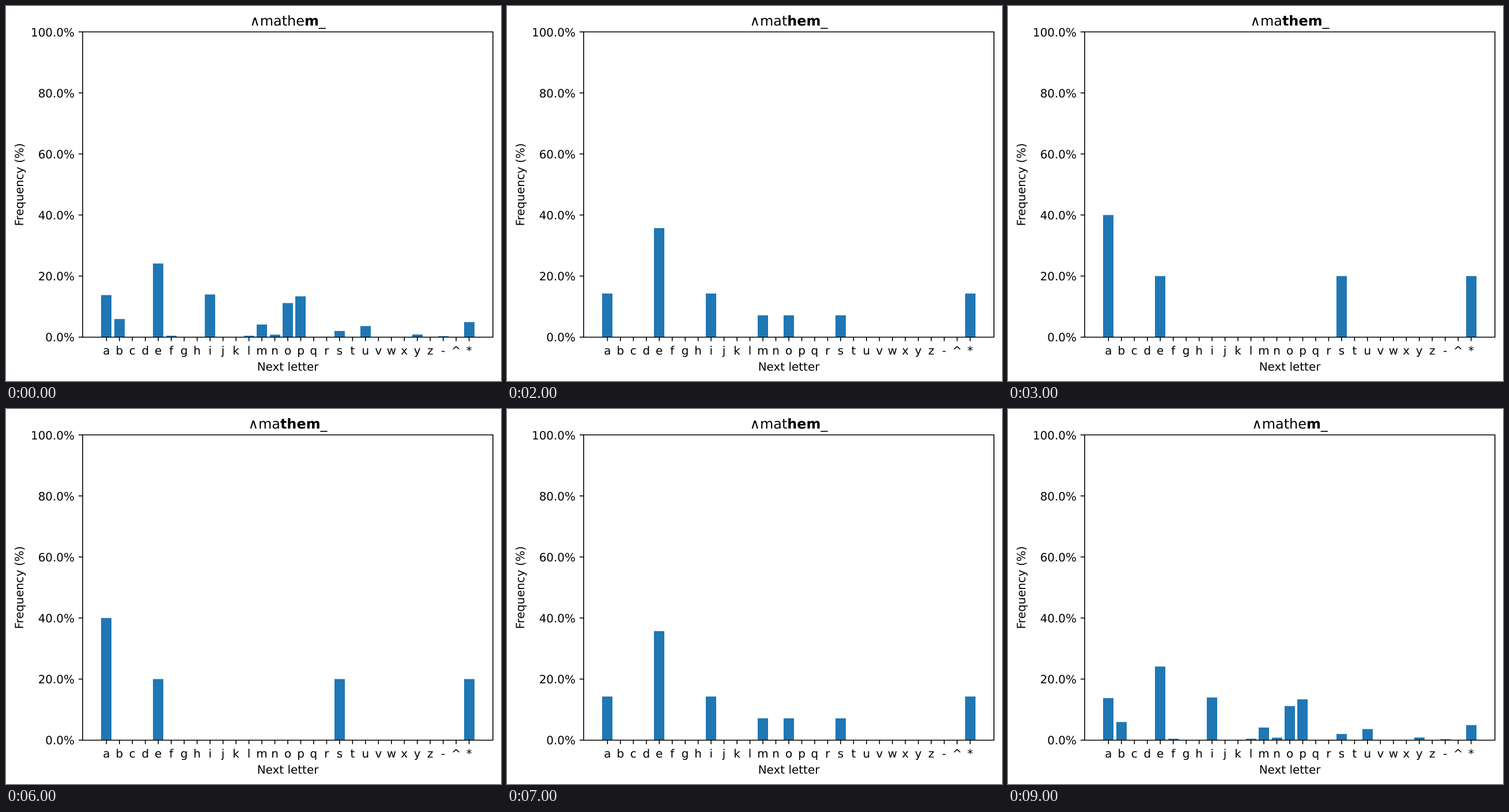
Write an HTML page that moves like this. It is 859 px wide and 652 px high and loops after 10000 ms.

```html
<!DOCTYPE html>
<html lang="en">
<head>
<meta charset="utf-8">
<title>Next letter frequency</title>
<style>
  html, body { margin: 0; width: 100%; height: 100%; overflow: hidden; background: #fff; }
  svg { display: block; width: 859px; height: 652px; }
  text { font: 19.94px "DejaVu Sans", sans-serif; text-rendering: geometricPrecision; white-space: pre; }
  .title { font-size: 23.93px; }
  .bold { font-weight: bold; }
  .line { fill: none; stroke: #000; stroke-width: 1.6; }
</style>
</head>
<body>
<svg viewBox="0 0 859 652">
  <g id="bars" fill="#1f77b4"></g>
  <g id="axes"></g>
  <text class="title" x="489" y="33.5" text-anchor="middle"><tspan id="plain"></tspan><tspan id="context" class="bold"></tspan><tspan>_</tspan></text>
</svg>
<script>
const LETTERS = [...'abcdefghijklmnopqrstuvwxyz-^*'];
const WORD = 'mathem';
const LEFT = 133, RIGHT = 845, TOP = 45, BOTTOM = 575.7;
const STEP = (RIGHT - LEFT) / 31.68;
const LOOP = 10000;

// Relative frequency of the next letter, by length of the bold context.
const CONTEXTS = {
  1: { a: 13.7, b: 5.9, e: 24, f: .45, i: 13.9, l: .45, m: 4.1, n: .8, o: 11.1, p: 13.3,
       r: .15, s: 2, u: 3.6, y: .85, '-': .3, '*': 4.9 },
  2: { a: 13, b: 12, e: 24, i: 10, m: 2, n: 1, o: 11, p: 11, s: 6, u: 2, y: 1, '*': 8 },
  3: { a: 2, e: 5, i: 2, m: 1, o: 1, s: 1, '*': 2 },
  4: { a: 2, e: 1, s: 1, '*': 1 },
  5: { a: 1 }
};

const byId = id => document.getElementById(id);
const centre = i => LEFT + (1.84 + i) * STEP;

function add(parent, name, attrs, content = '') {
  const node = document.createElementNS('http://www.w3.org/2000/svg', name);
  for (const key in attrs) node.setAttribute(key, attrs[key]);
  node.textContent = content;
  return parent.appendChild(node);
}

function label(content, x, y, anchor = 'middle', extra = {}) {
  add(byId('axes'), 'text', { x, y, 'text-anchor': anchor, ...extra }, content);
}

function line(d) {
  add(byId('axes'), 'path', { d, class: 'line' });
}

line(`M${LEFT} ${TOP}H${RIGHT}V${BOTTOM}H${LEFT}Z`);
for (let p = 0; p <= 100; p += 20) {
  const y = BOTTOM - p / 100 * (BOTTOM - TOP);
  line(`M${LEFT} ${y}h-7`);
  label(p.toFixed(1) + '%', 119, y + 7.6, 'end');
}
const bars = LETTERS.map((letter, i) => {
  const x = centre(i);
  line(`M${x} ${BOTTOM}v7`);
  label(letter, x, 605.6);
  const left = Math.round(x - .4 * STEP);
  return add(byId('bars'), 'rect', { x: left, width: Math.round(x + .4 * STEP) - left });
});
label('Next letter', 489, 634);
label('Frequency (%)', 0, 0, 'middle', { transform: 'translate(30 310.5) rotate(-90)' });

let shown = 0;

function show(length) {
  if (length === shown) return;
  shown = length;
  const split = WORD.length - length;
  byId('plain').textContent = '∧' + WORD.slice(0, split);
  byId('context').textContent = WORD.slice(split);
  const counts = CONTEXTS[length];
  const total = Object.values(counts).reduce((a, b) => a + b);
  bars.forEach((bar, i) => {
    const height = (counts[LETTERS[i]] || 0) / total * (BOTTOM - TOP);
    bar.setAttribute('y', BOTTOM - height);
    bar.setAttribute('height', height);
  });
}

// The context grows by one letter a second, then shrinks again.
function draw(now) {
  const second = Math.floor(now % LOOP / 1000);
  show(1 + Math.min(second, 9 - second));
}

const start = performance.now();
function tick() {
  draw(performance.now() - start);
  requestAnimationFrame(tick);
}
tick();
</script>
</body>
</html>
```
